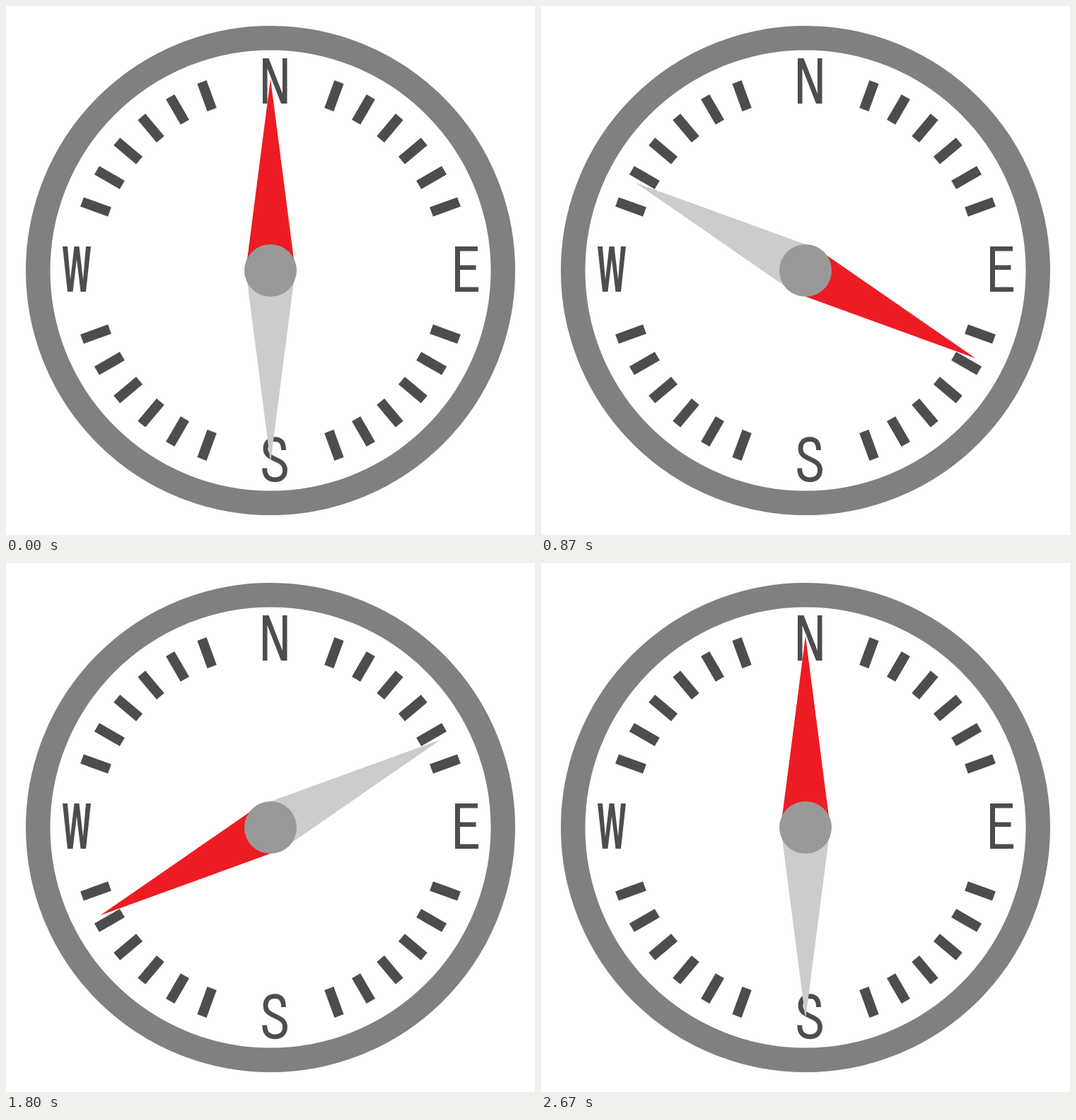
An HTML page that plays this animation: 748x748 px, repeating every 2.7 s.

```html
<!DOCTYPE html>
<html lang="en">
<head>
<meta charset="utf-8">
<title>Compass</title>
<style>
  html, body { margin: 0; width: 100%; height: 100%; overflow: hidden; background: #fff; }
  svg { display: block; width: 100vw; height: 100vh; }
</style>
</head>
<body>
<svg viewBox="0 0 748 748" role="img" aria-label="Compass dial: N, E, S, W">
  <circle cx="374" cy="374" r="328.75" fill="#fff" stroke="#808080" stroke-width="34.5"/>
  <g id="ticks" fill="#4d4d4d"></g>
  <g id="letters" fill="#4d4d4d">
    <path d="M363 74H371.5L391 124V74H397.5V138H389L369.5 88V138H363Z"/>
    <path d="M635 340H667V346.5H642V366.5H664.5V373H642V397.5H668V404H635Z"/>
    <path d="M392.5 628C392.5 617 388 612.7 380 612.7C371.5 612.7 367 618 367 625.5C367 633 370.5 636 379 640C389 644.5 394.5 647.5 394.5 656C394.5 665 389 669.8 380 669.8C370.5 669.8 365.7 664 365.7 653.5" fill="none" stroke="#4d4d4d" stroke-width="6.8"/>
    <path d="M80 340H87L91 387L96.5 340H103.5L109 387L113 340H120L113 404H105.5L100 358L94.5 404H87Z"/>
  </g>
  <g id="needle">
    <path d="M339 374L374 103L409 374Z" fill="#ed1c24"/>
    <path d="M339 374L374 645L409 374Z" fill="#ccc"/>
  </g>
  <circle cx="374" cy="374" r="37" fill="#999"/>
</svg>
<script>
  const CENTER = 374, LOOP = 2700, STEP = 30;
  const LAST = LOOP / STEP - 1;
  const ticks = document.getElementById('ticks');
  const needle = document.getElementById('needle');
  const turn = (el, deg) => el.setAttribute('transform', `rotate(${deg} ${CENTER} ${CENTER})`);

  function addTick(deg) {
    const tick = document.createElementNS(ticks.namespaceURI, 'rect');
    const box = { x: CENTER - 7, y: CENTER - 283.6, width: 14, height: 41.5 };
    for (const key in box) tick.setAttribute(key, box[key]);
    turn(tick, deg);
    ticks.append(tick);
  }

  // Six marks per quadrant, leaving room around each letter
  for (let quarter = 0; quarter < 360; quarter += 90)
    for (let deg = 20; deg <= 70; deg += 10) addTick(quarter + deg);

  // One full turn in even steps; the first and last step both point north
  function draw(now) {
    const step = Math.floor((now % LOOP) / STEP);
    turn(needle, step / LAST * 360);
    requestAnimationFrame(draw);
  }

  turn(needle, 0);
  requestAnimationFrame(draw);
</script>
</body>
</html>
```
